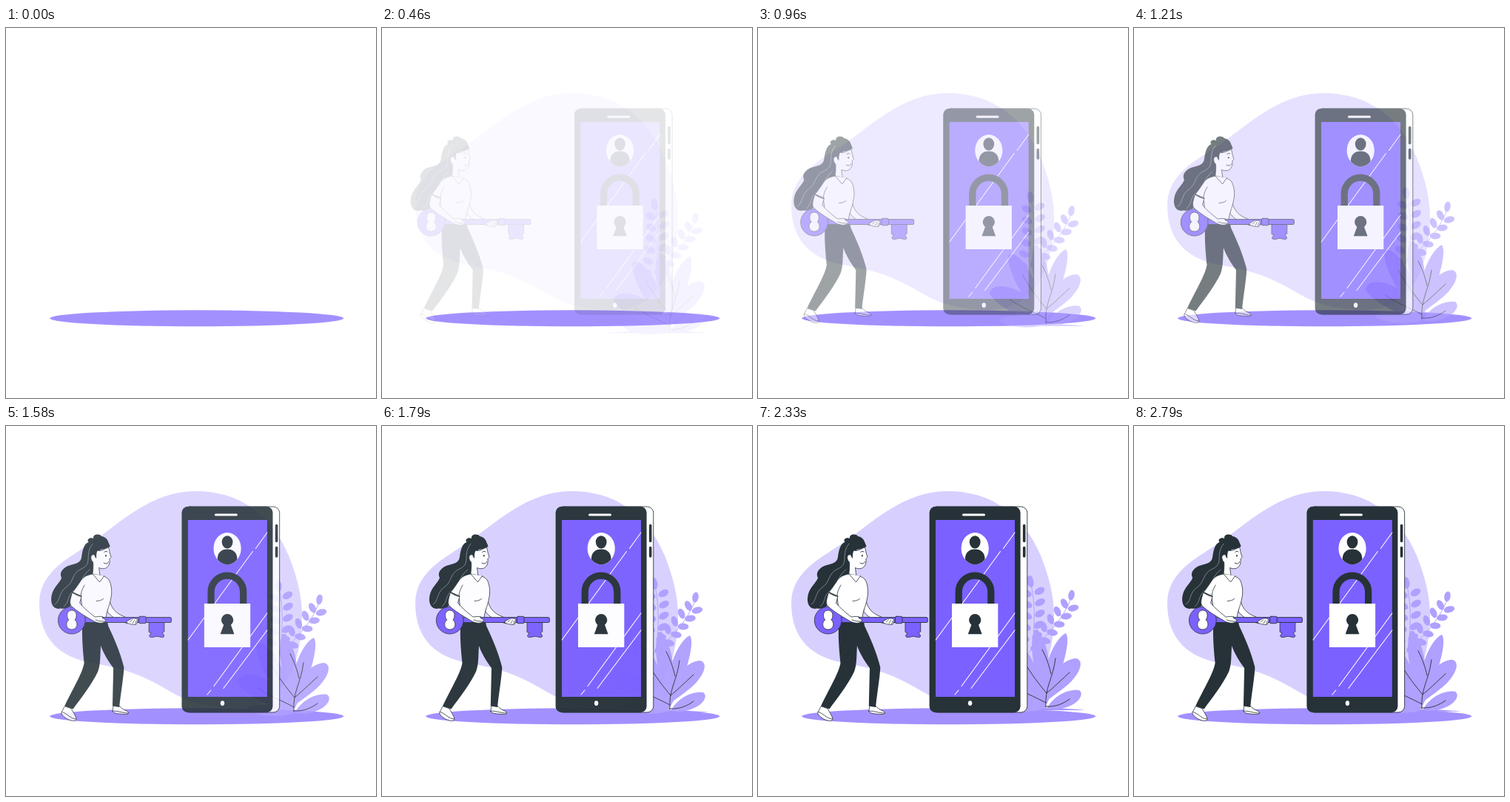
Animation, 500 px wide and 500 px high, one loop 2830 ms. Source, as an HTML page with a canvas:

```html
<!DOCTYPE html>
<html lang="en">
<head>
<meta charset="utf-8">
<title>Key and phone</title>
<style>
  html, body { margin: 0; width: 100%; height: 100%; overflow: hidden; background: #fff; }
  canvas { display: block; width: 500px; height: 500px; }
</style>
</head>
<body>
<canvas id="stage" width="500" height="500"></canvas>
<script>
const LOOP = 2830, HOLD = 210, SLIDE = 30;
const MAIN = '#7b61ff', DARK = '#263238', GROUND = '#a390ff',
      LEAF = '#b0a0ff', BLOB = '#d7d0ff', WHITE = '#fff';

const stage = document.getElementById('stage').getContext('2d');
const scratch = document.createElement('canvas');
scratch.width = scratch.height = 500;
const c = scratch.getContext('2d');
c.lineCap = c.lineJoin = 'round';

function shape(d, fill, line, width = 0.8) {
  const path = new Path2D(d);
  if (fill) { c.fillStyle = fill; c.fill(path); }
  if (line) { c.strokeStyle = line; c.lineWidth = width; c.stroke(path); }
}

function oval(x, y, rx, ry, fill, angle = 0, line) {
  c.beginPath();
  c.ellipse(x, y, rx, ry, angle * Math.PI / 180, 0, 2 * Math.PI);
  c.fillStyle = fill;
  c.fill();
  if (line) { c.strokeStyle = line; c.lineWidth = 0.8; c.stroke(); }
}

function box(x, y, w, h, r, fill, line) {
  c.beginPath();
  c.roundRect(x, y, w, h, r);
  c.fillStyle = fill;
  c.fill();
  if (line) { c.strokeStyle = line; c.lineWidth = 0.9; c.stroke(); }
}

// Paints a group as a whole, so that its parts fade together.
function layer(dx, dy, alpha, draw) {
  c.setTransform(1, 0, 0, 1, 0, 0);
  c.clearRect(0, 0, 500, 500);
  c.translate(dx, dy);
  draw();
  stage.globalAlpha = alpha;
  stage.drawImage(scratch, 0, 0);
}

// Cubic Bezier timing curve with a soft overshoot.
function ease(x) {
  const curve = (s, a, b) => 3 * (1 - s) ** 2 * s * a + 3 * (1 - s) * s * s * b + s ** 3;
  let low = 0, high = 1;
  for (let i = 0; i < 24; i++) {
    const mid = (low + high) / 2;
    if (curve(mid, 0.36, 0.5) < x) low = mid; else high = mid;
  }
  return curve(low, -0.01, 1.38);
}

function blob() {
  shape('M45 240C45 197 84 179 115 158C152 133 195 88 256 88C325 88 363 130 382 175' +
    'C394 205 400 232 400 255C400 322 375 382 312 381C262 380 240 370 212 353' +
    'C180 335 160 328 115 320C76 313 45 290 45 240Z', BLOB);
}

function ground() {
  oval(257.7, 392.3, 198.5, 11, GROUND);
}

function plant() {
  shape('M303 386C335 382 410 382 442 386Z', GROUND);

  // upright sprig
  shape('M372 312C369 290 379 255 368 212', null, LEAF, 1);
  oval(368, 212, 4.4, 8, LEAF, -8);
  for (let i = 0; i < 6; i++) {
    const y = 225 + i * 15.2, drift = Math.sin(i * 0.8) * 2;
    oval(380.5 + drift - i * 0.8, y, 7.3, 4.6, LEAF, -28);
    oval(363 + drift - i * 0.8, y + 3, 7.3, 4.6, LEAF, 25);
  }

  // leaning sprig
  shape('M366 308C382 292 412 268 424 232', null, LEAF, 1);
  oval(423.5, 230.5, 4.2, 7, LEAF, 10);
  for (let i = 0; i < 5; i++) {
    oval(414 - i * 9.3, 242 + i * 10.5, 4.3, 7.2, LEAF, -28 + i * 4);
    oval(426 - i * 9.5, 248 + i * 11, 7.4, 4.4, LEAF, -14 + i * 8);
  }

  shape('M389 376C360 359 337 311 338 291C350 278 382 325 389 376Z', LEAF);
  shape('M390 378C372 335 365 296 374 279C387 281 399 318 392 365Z', LEAF);
  shape('M390 378C379 338 398 291 416 282C424 292 409 342 390 378Z', LEAF);
  shape('M390 373C390 343 407 319 429 316C443 318 434 339 417 353C407 361 399 367 390 373Z', LEAF);
  shape('M390 384C400 366 419 357 434 359C441 364 434 375 422 380C412 385 400 386 390 384Z', LEAF);
  shape('M389 383C365 380 322 361 313 342C315 322 367 333 389 374Z', LEAF);
  shape('M389 384C370 391 333 388 326 377C337 370 372 371 389 384Z', LEAF);
  shape('M389 382C387 355 399 343 402 316M384 304C390 315 394 328 396 337' +
    'M421 335C410 345 399 356 390 363M357 316C370 339 380 351 390 363' +
    'M340 350C355 361 375 368 389 376M389 381C402 382 413 377 421 371', null, DARK, 0.9);
}

function phone() {
  box(236, 109, 129.8, 278, 8.5, WHITE, DARK);
  box(233.6, 108.8, 123, 278.4, 8.5, DARK);
  box(242, 127, 107, 239, 0, MAIN);
  shape('M279.5 120H307.5', null, WHITE, 3);
  oval(288.6, 374.6, 2.7, 3.4, WHITE);
  shape('M361.7 134.5V155.5M361.7 164.5V176', null, DARK, 3.6);

  shape('M349 144L333.5 165.5M329.5 169.5L242.2 289M349 253L277 351.5' +
    'M273 357L268 363M349 276L290 354.5', null, WHITE, 1.1);

  oval(295.2, 165.6, 18.6, 21.6, WHITE);
  oval(295.2, 156.8, 7.4, 8.6, DARK);
  shape('M281.8 180C282 171 287 166.5 295.2 166.5S308.4 171 308.6 180C302 189.5 288.5 189.5 281.8 180Z', DARK);

  c.lineCap = 'butt';
  shape('M273.2 241V224A21.8 21.8 0 0 1 316.8 224V241', null, DARK, 9.2);
  c.lineCap = 'round';
  box(264, 240, 62.3, 59, 0, WHITE);
  oval(295.2, 262.3, 8.1, 8.2, DARK);
  shape('M291 267H299.4L304.6 281.3H285.8Z', DARK);
}

function legs() {
  shape('M83 379L80 385C76 388 82 394 89 397C94 399 99 399 99 396C98 391 94 386 92 382Z' +
    'M149 377L148 384C147 389 157 389 164 389.5C170 390 171 387 167 385C162 383 159 381 157 378Z', WHITE, DARK);
  shape('M79.5 386.5C85 387 91 396 98.5 396M147.5 385.5C154 384 160 388 169.5 388', null, DARK);
  shape('M107.6 259C105.5 285 108.5 309 109.5 320C108 332 96 352 83 378.5L94.5 382.5' +
    'C105 368 120 349 128 332C132 322 131 309 132 297C135 306 142 318 149 327L147.8 378.5L157 380' +
    'C159 361 163 338 163.3 326C158 305 150 287 142 270L140 259Z', DARK);
}

function head() {
  shape('M142.5 164C144 155 139 150 133 149C130 145 121 146 122 152' +
    'C118 150 112 153 115.5 157C109 159 107 169 106 177C105 185 98 186 91 188' +
    'C82 190 75 198 79 205C77 212 68 217 65.5 229C63 241 69 249 78 246.5' +
    'C87 248 94 243 97 234C100 225 107 219 112 212C121 206 126 199 125 191L132 165Z', DARK);
  shape('M121 159C109 174 122 186 106 193C92 199 96 211 85 218C74 226 78 236 70 241' +
    'M117 194C105 203 106 215 96 222C86 229 90 238 82 244', null, '#aeb4b7', 0.6);
  shape('M126 167C132 171 136 166 142.5 164C144 168 143.5 171 145.8 176.5C146.3 178.5 144 178.5 143.8 180' +
    'C145 185 142.5 191 137.5 192.5C134 193.3 131 192.5 129.5 191.5L131 204L120.5 202C121.5 195 122 189 121.5 184' +
    'C118 181 117.5 174 121.5 174C124 173 125 176 125.5 178Z', WHITE, DARK);
  shape('M124 178C127 174 125 168 131 167C137 167 141 164 144.5 163C143 153 130 150 122 160Z', DARK);
  shape('M136.5 170.5C138 169 140 169 141 170M136 185C139 187 141.5 186 142.5 183.5', null, DARK, 0.9);
  oval(138.8, 175.2, 0.9, 1.3, DARK);
}

function torso() {
  shape('M143 233C146 246 151 251 158 255L171 261L169 267C157 264 147 259 141 251Z', WHITE, DARK);
  shape('M121 200C114 201 108 204 105 209C101 215 97 221 93.5 225L105 231C106 239 107 246 109 265' +
    'L139 265C138 252 144 244 145.5 233C148 224 146 213 143 208C141 205 138 204 136 203Z', WHITE, DARK);
  shape('M121 200L130.5 211L136.5 202.5', WHITE, DARK);
  shape('M105 231C105 223 108 219 110 215M126 236.5C130 236.5 133 235.5 135.5 233.5', null, DARK);
}

function key() {
  shape('M197 264V278.5L200 279.5L197.5 283.5C198 286 201 286 204 285L208 284.2L212 285' +
    'C215 286 218 286 217.5 283L215 279.5L217.8 278V264Z', MAIN, DARK);
  box(108, 258.6, 119.3, 6.9, 1.5, MAIN, DARK);
  box(183.5, 257.3, 9.5, 9.4, 1.5, MAIN, DARK);
  oval(92.7, 262.6, 18.4, 18.4, MAIN, 0, DARK);
  shape('M88.5 262C85.5 259 85 249 92.7 249S100 259 96.9 262C101.5 265 101 275 92.7 275S84 265 88.5 262Z', WHITE, DARK);
}

function arms() {
  shape('M93.5 225C91 233 89 239 92 243C99 250 111 257 122 263.5C128 267 134 267 138 264.5' +
    'L139 262C135 260 132 259 135 258C131 256.5 127 258 124 258C115 251 107 244 103.5 239L106 230Z', WHITE, DARK);
  shape('M93.8 224.5C97 227.5 101 229 105.5 230.5', null, DARK, 1.1);
  shape('M125 262C130 264 134 264 138 264', null, DARK);
  shape('M167 264L173 260.5C177 259.5 181 260 182 262L180.5 267.5C178 269.5 173 268 168 266.5Z', WHITE, DARK);
  shape('M171 265L174.5 262M175 267L177.5 262.5M178.5 268L180 263', null, DARK, 0.7);
}

function woman() {
  legs();
  head();
  torso();
  key();
  arms();
}

function render(time) {
  stage.globalAlpha = 1;
  stage.fillStyle = WHITE;
  stage.fillRect(0, 0, 500, 500);
  const progress = time < HOLD ? 0 : ease(Math.min(1, (time + 70) / 2880));
  const alpha = Math.max(0, Math.min(1, progress));
  const shift = SLIDE * (1 - progress);
  layer(0, 0, alpha, blob);
  layer(0, 0, 1, ground);
  layer(0, shift, alpha, plant);
  layer(shift, 0, alpha, phone);
  layer(-shift, 0, alpha, woman);
}

const start = performance.now();
function tick() {
  render((performance.now() - start) % LOOP);
  requestAnimationFrame(tick);
}
tick();
</script>
</body>
</html>
```
